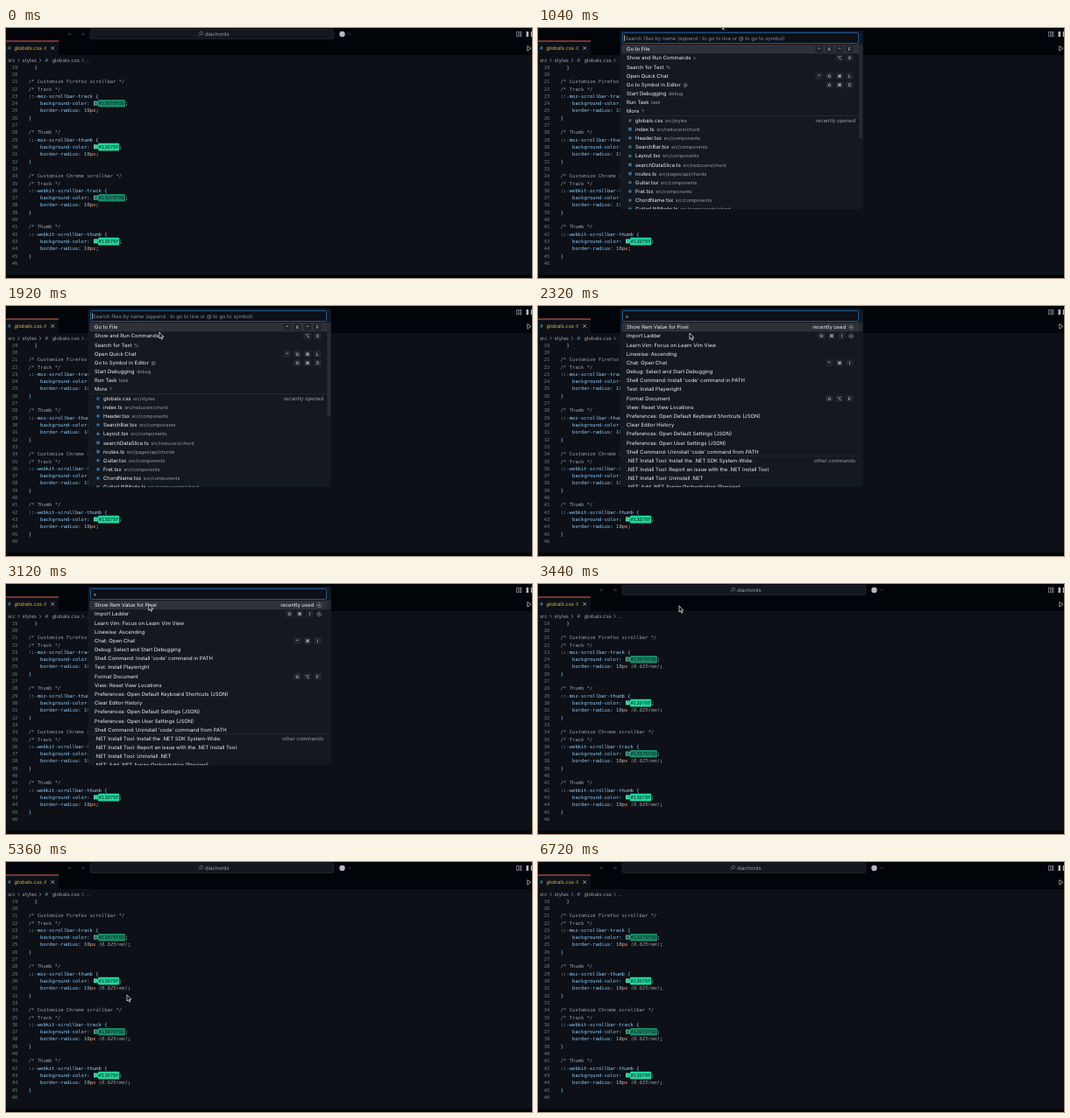
These frames come from a looping animation (600x286 px, 6.8 s). An HTML page:

```html
<!DOCTYPE html>
<html lang="en">
<head>
<meta charset="utf-8">
<title>Editor command palette</title>
<style>
  html, body { margin: 0; width: 100%; height: 100%; overflow: hidden; background: #010409; }
  svg { display: block; width: 100vw; height: 100vh; }
  text { white-space: pre; font: 5.9px Inter, "Noto Sans", sans-serif; text-rendering: geometricPrecision; }
  .code { font: 5.53px "DejaVu Sans Mono", monospace; }
  .key { font-size: 5px; font-family: Inter, "DejaVu Sans", sans-serif; }
  .small { font-size: 5.4px; }
  .italic { font-style: italic; }
</style>
</head>
<body>
<svg id="stage" viewBox="0 0 600 286"></svg>
<script>
const LOOP = 6800, STEP = 80;
const OPEN = 1040, COMMANDS = 2000, CLOSE = 3280;
const CHAR = 3.33, CODE_X = 25.8, LINE_HEIGHT = 8.31;
const C = {
  editor: '#0d1016', bar: '#010409', panel: '#14181f', selected: '#2e3238',
  text: '#eef2f6', dim: '#98a1ab', faint: '#707882', blue: '#8accff',
  orange: '#ffab78', yellow: '#dcb944', icon: '#4a9bd8', logo: '#356d98', green: '#13d79f'
};

const escapeText = s => s.replace(/&/g, '&amp;').replace(/</g, '&lt;').replace(/>/g, '&gt;');
const rect = (x, y, w, h, fill, more = '') =>
  `<rect x="${x}" y="${y}" width="${w}" height="${h}" fill="${fill}" ${more}/>`;
const path = (d, color, width = .6) =>
  `<path d="${d}" fill="none" stroke="${color}" stroke-width="${width}"/>`;
const circle = (x, y, r, fill) => `<circle cx="${x}" cy="${y}" r="${r}" fill="${fill}"/>`;
// Text is placed by the vertical middle of its line.
const label = (x, y, s, fill = C.text, cls = '', anchor = 'start') =>
  `<text x="${x}" y="${y + 2.1}" fill="${fill}" class="${cls}" text-anchor="${anchor}">${escapeText(s)}</text>`;
const code = (column, y, s, fill, cls = '') =>
  label(CODE_X + column * CHAR, y, s, fill, 'code ' + cls);
const chevron = (x, y, color = C.dim) => path(`M${x - 1} ${y - 2}l2 2l-2 2`, color);

function titleBar() {
  const arrow = (x, dir) => path(`M${x - 2} 7h4M${x + dir * .4} 5.3l${dir * 1.6} 1.7l${-dir * 1.6} 1.7`, '#565d66', .5);
  return `<g id="center">
    ${arrow(73, -1)}${arrow(87.5, 1)}
    ${rect(96, 1.2, 278, 11.3, '#14171d', 'rx="2" stroke="#2a2e35" stroke-width=".6"')}
    ${path('M219.5 9.3l2-2', C.dim, .5)}<circle cx="222.8" cy="6" r="1.8" fill="none" stroke="${C.dim}" stroke-width=".5"/>
    ${label(227, 7, 'diachords', C.dim)}
    ${circle(383.5, 7, 3.2, '#b4bac2')}${path('M390.8 6.3l1.2 1.2l1.2-1.2', C.dim, .5)}
  </g>` + path('M582.5 4.3h2.2v5.4h-2.2zM586 4.3h2v2h-2zM586 7.7h2v2h-2z', '#b4bac2', .6)
    + rect(593.5, 4, 2.5, 6, '#b4bac2') + rect(598.8, 4, 1.2, 6, '#b4bac2');
}

function tabsAndPath() {
  return rect(0, 14.5, 60, 17, C.editor) + rect(0, 14.5, 60, 1, '#e0604f')
    + label(2, 23, '#', C.icon) + label(9.5, 23, 'globals.css', C.yellow, 'italic')
    + label(43, 23, '8', '#a08b38', 'small italic')
    + path('M51.4 21.2l3.6 3.6m0-3.6l-3.6 3.6', C.text, .6)
    + path('M594.8 20.5l4 2.8l-4 2.8z', C.text)
    + label(2, 37, 'src', C.dim) + chevron(14.5, 37) + label(18.5, 37, 'styles', C.dim)
    + chevron(39, 37) + label(44.5, 37, '#', C.icon) + label(52.5, 37, 'globals.css', C.dim)
    + chevron(87.5, 37) + label(91, 37, '…', C.dim);
}

function colorLine(y, hex) {
  const x = 105.5, width = hex.length * CHAR, clear = hex.length > 7;
  return code(4, y, 'background-color:', C.blue)
    + rect(100.3, y - 2.1, 4.2, 4.2, C.green, `fill-opacity="${clear ? .55 : 1}" stroke="#d5dce2" stroke-width=".5"`)
    + rect(x - .5, y - 4.1, width + 1, 8.6, clear ? '#188a68' : '#1fd69c', 'rx="1.3"')
    + label(x, y, hex, '#0a2a20', 'code') + label(x + width + .5, y, ';', C.text, 'code');
}

function radiusLine(y) {
  return code(4, y, 'border-radius:', C.blue) + code(19, y, '10', C.blue) + code(21, y, 'px', C.orange)
    + `<g class="plain">${code(23, y, ';', C.text)}</g>`
    + `<g class="rem">${code(24, y, '(0.625rem)', C.dim, 'italic')}${code(34, y, ';', C.text)}</g>`;
}

function editor() {
  const lineY = n => 44.5 + (n - 19) * LINE_HEIGHT;
  let out = code(2, lineY(19), '}', C.blue);
  for (let n = 19; n <= 46; n++) out += label(13.3, lineY(n), String(n), C.faint, 'code', 'end');
  const rule = (n, engine, part) => out +=
    code(0, lineY(n), `/* ${part} */`, C.dim)
    + code(0, lineY(n + 1), `::-${engine}-scrollbar-${part.toLowerCase()} {`, C.blue)
    + colorLine(lineY(n + 2), part === 'Track' ? '#13D79F8D' : '#13D79F')
    + radiusLine(lineY(n + 3)) + code(0, lineY(n + 4), '}', C.blue);
  [[21, 'Firefox', 'moz'], [34, 'Chrome', 'webkit']].forEach(([n, browser, engine]) => {
    out += code(0, lineY(n), `/* Customize ${browser} scrollbar */`, C.dim);
    rule(n + 1, engine, 'Track');
    rule(n + 7, engine, 'Thumb');
  });
  return out;
}

const rowY = i => 24.2 + i * 10.17;

function keys(y, names, right = 360.5) {
  return [...names].reverse().map((name, i) => {
    const x = right - 5 - i * 11.6;
    return rect(x - 4.4, y - 4, 8.8, 8, '#20252c', 'rx="1.5"')
      + label(x, y, name, C.text, 'key', 'middle');
  }).join('');
}

const gear = y => `<circle cx="357.3" cy="${y}" r="2.4" fill="none" stroke="${C.dim}" stroke-width="1" stroke-dasharray="1.2 .7"/>`
  + circle(357.3, y, .9, C.dim);

const entry = (x, y, name, note = '') =>
  `<text x="${x}" y="${y + 2.1}" fill="${C.text}">${escapeText(name)}`
  + `<tspan class="small" dx="2.5" fill="${C.dim}">${escapeText(note)}</tspan></text>`;

const row = (i, name, note) => entry(101, rowY(i), name, note);

function fileRow(i, name, folder) {
  const y = rowY(i);
  const icon = name.endsWith('.css') ? label(103, y, '#', C.icon)
    : name.endsWith('.tsx') ? circle(105, y, 1.8, C.logo) : rect(103.2, y - 1.8, 3.6, 3.6, C.logo);
  return icon + entry(111, y, name, folder);
}

const separator = i => rect(95, rowY(i) - 5.2, 274, .5, '#30353c');

function panel(id, input, rows, thumbHeight) {
  return `<g id="${id}" clip-path="url(#panelClip)">
    ${rect(93.5, 3, 277.5, 204.3, C.panel, 'rx="2"')}
    ${rect(96.5, 5.5, 269, 12, C.editor, 'rx="1" stroke="#22609f" stroke-width=".9"')}
    ${input}${rect(95.5, 19, 273, 10.2, C.selected, 'rx="1"')}
    ${rows}${rect(366.2, 19, 4.2, thumbHeight, '#262b32')}</g>`;
}

function filePanel() {
  const actions = [['Go to File'], ['Show and Run Commands', '>'], ['Search for Text', '%'], ['Open Quick Chat'],
    ['Go to Symbol in Editor', '@'], ['Start Debugging', 'debug'], ['Run Task', 'task'], ['More', '?']];
  const files = [['globals.css', 'src/styles'], ['index.ts', 'src/reducers/chord'], ['Header.tsx', 'src/components'],
    ['SearchBar.tsx', 'src/components'], ['Layout.tsx', 'src/components'], ['searchDataSlice.ts', 'src/reducers/chord'],
    ['routes.ts', 'src/pages/api/chords'], ['Guitar.tsx', 'src/components'], ['Fret.tsx', 'src/components'],
    ['ChordName.tsx', 'src/components'], ['GuitarUtilMode.ts', 'src/components/chord']];
  const rows = actions.map((a, i) => row(i, ...a)).join('')
    + files.map((f, i) => fileRow(i + 8, ...f)).join('')
    + keys(rowY(0), '⌃X⌃F') + keys(rowY(1), '⌥X') + keys(rowY(3), '⌃⇧⌘L') + keys(rowY(4), '⇧⌘O')
    + separator(8) + label(362, rowY(8), 'recently opened', C.dim, '', 'end');
  const hint = 'Search files by name (append : to go to line or @ to go to symbol)';
  return panel('files', label(99, 11.6, hint, '#858d97') + rect(98.4, 8, .6, 7, C.text), rows, 107);
}

function commandPanel() {
  const names = ['Show Rem Value for Pixel', 'Import Ladder', 'Learn Vim: Focus on Learn Vim View', 'Linewise: Ascending',
    'Chat: Open Chat', 'Debug: Select and Start Debugging', "Shell Command: Install 'code' command in PATH",
    'Test: Install Playwright', 'Format Document', 'View: Reset View Locations',
    'Preferences: Open Default Keyboard Shortcuts (JSON)', 'Clear Editor History',
    'Preferences: Open Default Settings (JSON)', 'Preferences: Open User Settings (JSON)',
    "Shell Command: Uninstall 'code' command from PATH", '.NET Install Tool: Install the .NET SDK System-Wide.',
    '.NET Install Tool: Report an issue with the .NET Install Tool.', '.NET Install Tool: Uninstall .NET',
    '.NET: Add .NET Aspire Orchestration (Preview)'];
  const rows = names.map((name, i) => row(i, name)).join('')
    + label(351, rowY(0), 'recently used', C.text, '', 'end') + gear(rowY(0)) + gear(rowY(1))
    + keys(rowY(1), '⇧⌘I', 351.5) + keys(rowY(4), '⌃⌘I') + keys(rowY(8), '⇧⌥F')
    + separator(15) + label(362, rowY(15), 'other commands', C.dim, '', 'end');
  return panel('commands', label(99.5, 11.6, '>'), rows, 10);
}

const stage = document.getElementById('stage');
stage.innerHTML = `<defs><clipPath id="panelClip">${rect(93, 0, 279, 207.3, '#000')}</clipPath></defs>`
  + rect(0, 0, 600, 286, C.bar) + rect(0, 31, 600, 251.5, C.editor)
  + titleBar() + tabsAndPath() + editor() + filePanel() + commandPanel()
  + `<g id="pointer"><path id="arrow" d="M0 0v7l1.6-1.4l1.1 2.5l1.2-.5l-1.1-2.4h2.1z" fill="#000" stroke="#fff" stroke-width=".7"/>
     <path id="beam" d="M-1.4 0q1.4 0 1.4 1q0-1 1.4-1M0 1v6M-1.4 8q1.4 0 1.4-1q0 1 1.4 1" fill="none" stroke="#fff" stroke-width=".9"/></g>`;

// Pointer stops: time, x, y. It enters and leaves over the top edge.
const route = [[0, 215, -10], [960, 215, -10], [1200, 201, 3], [1840, 175, 30],
  [2320, 173, 31], [3040, 163, 23], [3440, 161, 25], [3840, 170, 45], [4560, 256, 240],
  [5360, 138, 152], [5680, 138, 152], [6320, 392, 4], [6640, 376, -10], [LOOP, 376, -10]];

function pointerAt(t) {
  const next = route.findIndex(stop => stop[0] > t);
  const [t0, x0, y0] = route[next - 1], [t1, x1, y1] = route[next];
  const u = (t - t0) / (t1 - t0), k = u * u * (3 - 2 * u);
  return [x0 + (x1 - x0) * k, y0 + (y1 - y0) * k];
}

const show = (selector, on) =>
  stage.querySelectorAll(selector).forEach(el => el.setAttribute('visibility', on ? 'visible' : 'hidden'));

function draw(now) {
  const t = Math.floor(now % LOOP / STEP) * STEP;
  const open = t >= OPEN && t < CLOSE;
  const [x, y] = pointerAt(t);
  const overInput = open && y < 14;
  show('#center', !open);
  show('#files', open && t < COMMANDS);
  show('#commands', open && t >= COMMANDS);
  show('.plain', t < CLOSE);
  show('.rem', t >= CLOSE);
  show('#arrow', !overInput);
  show('#beam', overInput);
  stage.querySelector('#pointer').setAttribute('transform', `translate(${x} ${y})`);
}

let start;
function tick(now) {
  start ??= now;
  draw(now - start);
  requestAnimationFrame(tick);
}
draw(0);
requestAnimationFrame(tick);
</script>
</body>
</html>
```
